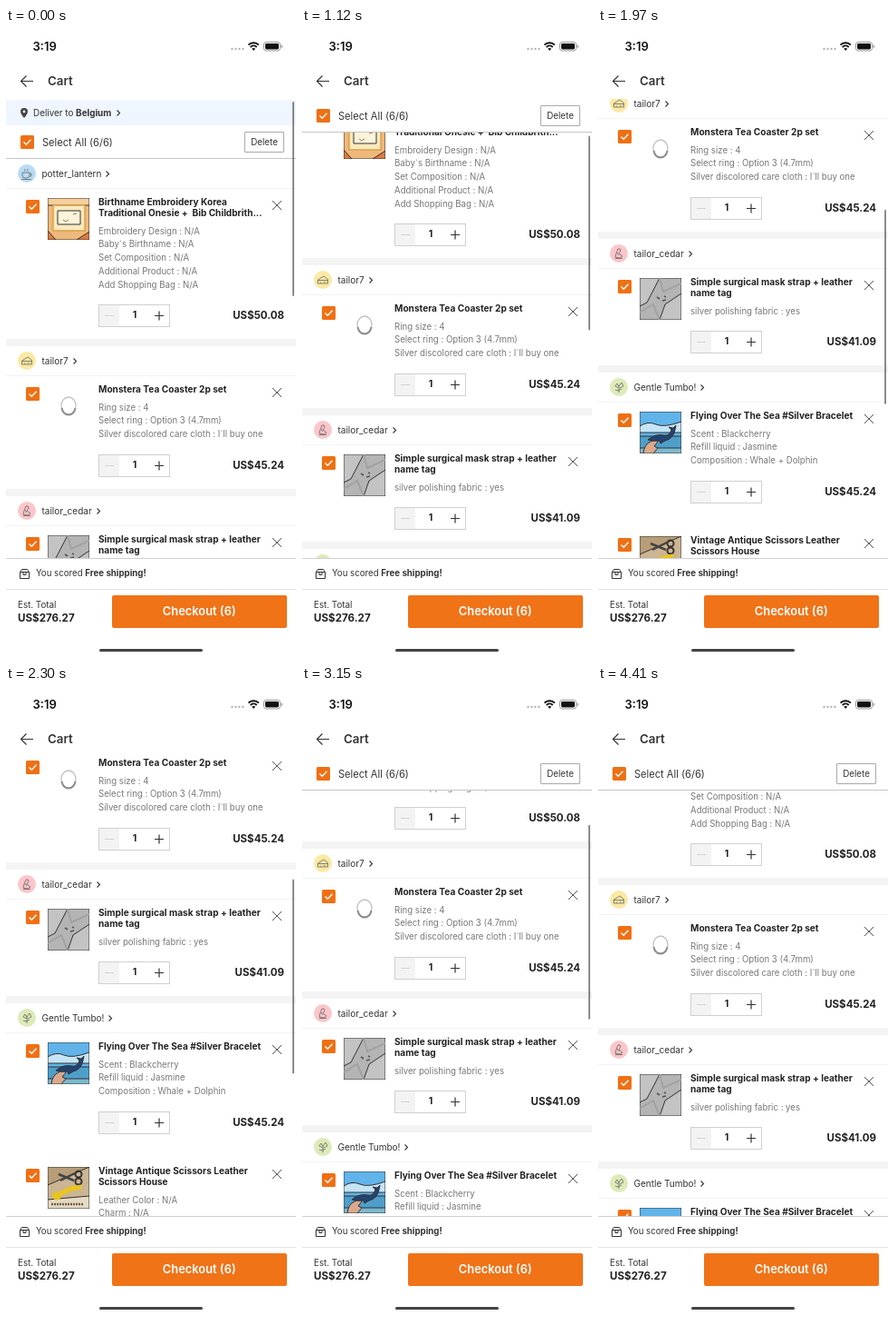
An HTML page that plays this animation: 320 by 693 pixels, repeating every 4450 ms.

```html
<!DOCTYPE html>
<html lang="en">
<head>
<meta charset="utf-8">
<title>Cart</title>
<style>
  html, body { margin: 0; width: 100%; height: 100%; overflow: hidden; background: #fff; }
  #stage { position: relative; width: 320px; height: 693px; overflow: hidden; background: #fff;
    font: 400 9.65px/14px Inter, "Liberation Sans", sans-serif; color: #333; --s: 0; }
  #stage *, .abs { position: absolute; }
  #stage b, #stage svg *, #stage .inline { position: static; }
  .t { white-space: pre; }
  b, .bold { font-weight: 700; }
  svg { overflow: visible; fill: none; stroke: #333; }
  .bar { left: 0; width: 320px; background: #fff; }

  #list { left: 0; top: 0; width: 320px; transform: translateY(calc(var(--s) * -1px)); }
  #deliver { top: 79px; height: 28px; background: #f0f6ff;
    transform: translateY(calc(min(var(--s), 29) * -1px)); }
  #select { top: 107px; height: 36px; border-bottom: 1px solid #c6c6c6;
    transform: translateY(calc((min(var(--s), 29) + clamp(0, var(--s) - 236, 38)) * -1px)); }
  #thumb { left: 315.5px; top: 80.5px; width: 2.5px; height: 214px; border-radius: 2px;
    background: rgba(0, 0, 0, .45); transform: translateY(calc(var(--s) * .42px)); }

  .gap { left: 0; width: 320px; height: 8px; background: #f4f4f4; }
  .rule { left: 0; width: 320px; height: 1px; background: #f3f3f3; }
  .name { font-size: 10px; }
  .title { font-size: 10.1px; line-height: 11.5px; font-weight: 700; color: #222; }
  .options { line-height: 14.75px; color: #777; }
  .price { right: 13px; font-size: 11.5px; font-weight: 700; color: #222; }
  .check { width: 15px; height: 15px; border-radius: 1.5px; background: #ef7014; }
  .check svg { left: 3px; top: 4px; stroke: #fff; stroke-width: 1.4; }
  .stepper { left: 102px; width: 77px; height: 23px; border: 1px solid #d0d0d0; box-sizing: content-box; }
  .stepper i { left: 0; top: 0; width: 22px; height: 23px; background: #f3f3f3; }
  .stepper .t { left: 29px; width: 20px; top: 4.5px; text-align: center; font-size: 10.5px; font-weight: 700; color: #222; }
  .photo { left: 46px; width: 46px; height: 46px; overflow: hidden; }
  .delete { left: 263px; top: 7px; width: 42px; height: 21px; border: 1px solid #aaa; border-radius: 1px;
    line-height: 21px; text-align: center; font-size: 9.8px; }
  .button { left: 116.5px; top: 41px; width: 193.5px; height: 36px; border-radius: 2px; background: #f07318;
    color: #fff; font: 600 12.9px/36px Inter, "Liberation Sans", sans-serif; text-align: center; }
</style>
</head>
<body>
<div id="stage">
  <div id="list"></div>

  <div id="select" class="bar">
    <div class="check" style="left:15.5px;top:11px"><svg width="9" height="7"><path d="M.5 3.5 3.3 6.2 8.5.8"/></svg></div>
    <div class="t" style="left:40px;top:12px;font-size:11.1px">Select All (6/6)</div>
    <div class="delete">Delete</div>
  </div>

  <div id="deliver" class="bar">
    <svg width="8" height="11" style="left:15.5px;top:8.5px"><path d="M4 0a4 4 0 0 1 4 4c0 2.6-4 7-4 7S0 6.600 0 4a4 4 0 0 1 4-4Z" fill="#444" stroke="none"/><circle cx="4" cy="4" r="1.4" fill="#f0f6ff" stroke="none"/></svg>
    <div class="t" style="left:30px;top:7px;font-size:9.9px">Deliver to <b>Belgium</b></div>
    <svg width="4" height="7" style="left:122px;top:10.500px"><path d="M.5.5 3.500 3.500.500 6.500" stroke-width="1.1"/></svg>
  </div>

  <div class="bar" style="top:0;height:78px">
    <div class="t" style="left:29.500px;top:13px;font-size:13px;font-weight:600;color:#111">3:19</div>
    <svg width="320" height="78" style="left:0;top:0">
      <g fill="#b5b5b5" stroke="none">
        <circle cx="249.500" cy="23" r="1.200"/><circle cx="253.500" cy="23" r="1.200"/>
        <circle cx="257.500" cy="23" r="1.200"/><circle cx="261.500" cy="23" r="1.200"/>
      </g>
      <g stroke="#111" stroke-width="1.900">
        <path d="M267.500 18.700a8 8 0 0 1 11.400 0M269.700 21a5 5 0 0 1 7 0"/>
        <path d="m273.200 25-2-2.200a3 3 0 0 1 4 0Z" fill="#111" stroke="none"/>
      </g>
      <rect x="284.500" y="15.500" width="18" height="9.500" rx="2.600" stroke="#999"/>
      <rect x="286" y="17" width="15" height="6.500" rx="1.400" fill="#111" stroke="none"/>
      <path d="M304.300 18.700v3" stroke="#999" stroke-width="1.300"/>
      <path d="M30 58.500H17M22.500 52.500l-6 6 6 6" stroke-width="1.200"/>
    </svg>
    <div class="t" style="left:46px;top:51px;font-size:13.300px;font-weight:600">Cart</div>
  </div>

  <div class="bar" style="top:583px;height:110px">
    <div class="rule" style="top:0;background:#cfcfcf"></div>
    <svg width="11" height="11" style="left:14.500px;top:11.500px"><path d="M.5 3.500h10v7H.5zM.5 3.500l2-3h6l2 3M4 3.500v3h3v-3"/></svg>
    <div class="t" style="left:33px;top:10px;font-size:9.700px">You scored <b>Free shipping!</b></div>
    <div class="rule" style="top:34px;background:#e4e4e4"></div>
    <div class="t" style="left:13px;top:44.500px;font-size:9.800px">Est. Total</div>
    <div class="t bold" style="left:13px;top:59px;font-size:11.600px;color:#222">US$276.27</div>
    <div class="button">Checkout (6)</div>
    <div style="left:103px;top:99.500px;width:114px;height:3.500px;border-radius:2px;background:#444"></div>
  </div>

  <div id="thumb"></div>
</div>

<script>
const svg = (x, y, w, h, body, extra = '') =>
  `<svg width="${w}" height="${h}" style="left:${x}px;top:${y}px" ${extra}>${body}</svg>`;
const text = (cls, x, y, str) => `<div class="t ${cls}" style="left:${x}px;top:${y}px">${str}</div>`;

const avatars = {
  cup: ['#b8dcf4', '<path d="M5 9h8v3a3 3 0 0 1-3 3H8a3 3 0 0 1-3-3ZM13 10h2v3h-2M4 16.500h11M8 7.500q-1-1 0-2.500M11 7.500q-1-1 0-2.500"/>'],
  cake: ['#fbe9a4', '<path d="M4.500 10 11 6l4.500 3.500V14h-11ZM4.500 10.500h11M7 13h1M11 12.500h1.500"/>'],
  bird: ['#fbc6ca', '<path d="M9 5q3-1 3 2l-2 3 4 3-3 2-5-1 1-4ZM6 15.500h8M8 9l2 3"/>'],
  leaf: ['#dcebb8', '<path d="M10 16V8M10 11 6 9l2-3 2 3 3-4 2 4-4 2M6 13l3 1 4-2"/>'],
};

const photos = {
  sampler: `<rect width="46" height="46" fill="#efb87c"/><path d="M0 0h46v8H0z" fill="#f5cf9d"/>
    <rect x="6" y="8" width="35" height="28" fill="#f9e9bd" stroke="#d9a34b" stroke-width="1.500"/>
    <path d="M11 14h25v15H11z" fill="#fbf3da"/><path d="m17 24 3 2 3-2M28 18l4-1" stroke="#a87848"/>
    <path d="M0 36l9 10H0zM32 46l14-9v9z" fill="#e07a3e"/>`,
  ring: `<ellipse cx="23" cy="22.500" rx="8" ry="9.500" stroke="#c4c4c4" stroke-width="1.300"/>
    <path d="M15.500 25q1.500 7.500 7.500 7.500t7.500-7.500" stroke="#8d8d8d" stroke-width="2"/>`,
  cloth: `<rect width="46" height="46" fill="#b4b4b4"/><path d="M0 0h22L8 27 0 31zM28 29l18-12v29H22z" fill="#c3c3c3"/>
    <path d="m22 0 4 15 20-9M0 38l15-9 7 17" stroke="#a2a2a2" stroke-width="2"/>
    <path d="m19 21 3 2M25 25l4-1M27 20l2 1" stroke="#555" stroke-width="1.600"/>`,
  whale: `<rect width="46" height="46" fill="#60b4ea"/><path d="M0 16q9-6 18-2t28-3v12H0z" fill="#c5e4f5"/>
    <path d="M0 27h46v19H0z" fill="#4d9fca"/><path d="M0 40h46v6H0z" fill="#7cb9ce"/>
    <path d="M4 46q1-10 8-13l6-3 2 3-4 5 4 2-5 6z" fill="#dba88c"/>
    <path d="M9 31q8-7 18-5 6 1 8-6l-3-3 5 1 3-3-1 5q-2 10-11 12l-5 3-1-3q-7 1-13-1z" fill="#24426f"/>`,
  scissors: `<rect width="46" height="46" fill="#cbb592"/><path d="M0 0h46L0 20z" fill="#b79d78"/>
    <path d="M0 36l46-4v14H0z" fill="#e6dac3"/><path d="M4 41h36" stroke="#6b604f" stroke-width="2.500" stroke-dasharray="2 1"/>
    <path d="m12 8 17 7M14 15l16-8" stroke="#444" stroke-width="2.500"/><circle cx="34" cy="8" r="3.500" stroke="#333" stroke-width="2"/><circle cx="34" cy="16" r="3.500" stroke="#333" stroke-width="2"/>
    <path d="m6 33 20-9 11-2" stroke="#e9c51f" stroke-width="5"/><circle cx="10" cy="32" r="3.500" stroke="#e9c51f" stroke-width="2.500"/>`,
};

const shop = [
  { name: 'potter_lantern', avatar: 'cup', items: [
    { title: ['Birthname Embroidery Korea', 'Traditional Onesie +  Bib Childbrith...'], photo: 'sampler', price: '50.08',
      options: ['Embroidery Design : N/A', 'Baby`s Birthname : N/A', 'Set Composition : N/A', 'Additional Product : N/A', 'Add Shopping Bag : N/A'] }] },
  { name: 'tailor7', avatar: 'cake', items: [
    { title: ['Monstera Tea Coaster 2p set'], photo: 'ring', price: '45.24',
      options: ['Ring size : 4', 'Select ring : Option 3 (4.7mm)', 'Silver discolored care cloth : I`ll buy one'] }] },
  { name: 'tailor_cedar', avatar: 'bird', items: [
    { title: ['Simple surgical mask strap + leather', 'name tag'], photo: 'cloth', price: '41.09',
      options: ['silver polishing fabric : yes'] }] },
  { name: 'Gentle Tumbo!', avatar: 'leaf', items: [
    { title: ['Flying Over The Sea #Silver Bracelet'], photo: 'whale', price: '45.24',
      options: ['Scent : Blackcherry', 'Refill liquid : Jasmine', 'Composition : Whale + Dolphin'] },
    { title: ['Vintage Antique Scissors Leather', 'Scissors House'], photo: 'scissors', price: '45.24',
      options: ['Leather Color : N/A', 'Charm : N/A'] }] },
];

const tick = '<svg width="9" height="7"><path d="M.5 3.500 3.300 6.200 8.500.8"/></svg>';
const chevron = '<svg class="inline" width="4" height="7" style="margin-left:5px"><path d="M.5.5 3.500 3.500.5 6.500" stroke-width="1.100"/></svg>';

function sellerRow(seller, y) {
  const [color, glyph] = avatars[seller.avatar];
  return svg(13, y - 10, 20, 20, `<circle cx="10" cy="10" r="10" fill="${color}" stroke="none"/><g stroke="#666" stroke-width=".8">${glyph}</g>`)
    + text('name', 39.5, y - 7, seller.name + chevron)
    + `<div class="rule" style="top:${y + 16}px"></div>`;
}

function itemRow(item, y, optionY, stepY) {
  return `<div class="check" style="left:22px;top:${y - 3}px">${tick}</div>`
    + `<div class="photo" style="top:${y - 5}px">${svg(0, 0, 46, 46, photos[item.photo], 'stroke="none"')}</div>`
    + text('title', 102, y - 6, item.title.join('\n'))
    + text('options', 102, optionY - 7.5, item.options.join('\n'))
    + svg(293.5, y - 2.5, 10, 10, '<path d="m0 0 10 10M10 0 0 10" stroke="#555"/>')
    + `<div class="stepper" style="top:${stepY - 12.5}px"><i></i>${text('', 29, 4.5, '1')}`
    + svg(6, 6, 10, 11, '<path d="M0 5.500h10" stroke="#d3d3d3"/>')
    + svg(61, 6, 10, 11, '<path d="M0 5.500h10M5 .5v10" stroke-width="1.200"/>') + '</div>'
    + `<div class="t price" style="top:${stepY - 7}px">US$${item.price}</div>`;
}

let html = '', y = 160;
for (const seller of shop) {
  html += sellerRow(seller, y);
  y += 32;
  for (const item of seller.items) {
    const optionY = y + (item.title.length > 1 ? 32 : 20);
    const stepY = Math.round(optionY + 14.75 * (item.options.length - 1) + 33);
    html += itemRow(item, y, optionY, stepY);
    y = stepY + 54;
  }
  y -= 4;
  html += `<div class="gap" style="top:${y - 24}px"></div>`;
}
document.getElementById('list').innerHTML = html;

// Scroll keys: time in ms, offset in px, speed in px per ms
const keys = [[520, 0, .08], [1120, 89, .24], [1670, 230, .22], [2300, 313, .05],
  [2450, 317, 0], [2820, 250, -.28], [3550, 131, 0]];
const LOOP = 4450, STEP = 30;

function scrollAt(t) {
  if (t <= keys[0][0]) return keys[0][1];
  const i = keys.findIndex(k => k[0] > t);
  if (i < 0) return keys[keys.length - 1][1];
  const [t0, a, va] = keys[i - 1], [t1, b, vb] = keys[i];
  const d = t1 - t0, u = Math.floor((t - t0) / STEP) * STEP / d, w = 1 - u;
  return a + (b - a) * u * u * (3 - 2 * u) + d * u * w * (va * w - vb * u);
}

const stage = document.getElementById('stage'), thumb = document.getElementById('thumb');
const fadeAt = t => t < 4300 ? 1 : t < 4350 ? .6 : t < 4410 ? .25 : 0;
const start = performance.now();

function draw() {
  const t = (performance.now() - start) % LOOP;
  stage.style.setProperty('--s', Math.round(scrollAt(t)));
  thumb.style.opacity = fadeAt(t);
  requestAnimationFrame(draw);
}
draw();
</script>
</body>
</html>
```
